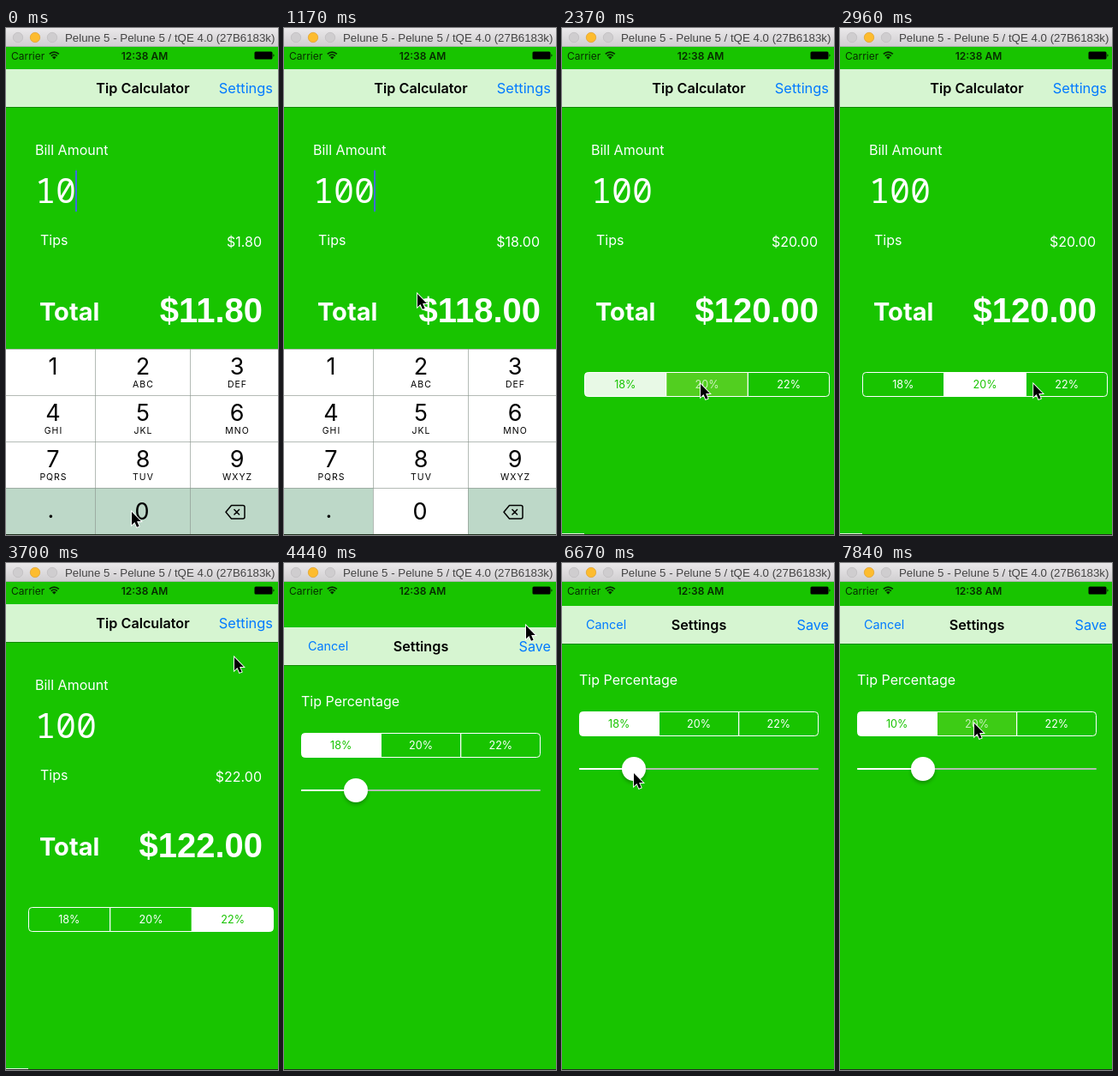
Animation of 318x591 px, one loop 7.99 s. Source, as an HTML page:

```html
<!DOCTYPE html>
<html lang="en">
<head>
<meta charset="utf-8">
<title>Tip Calculator</title>
<style>
html, body { margin: 0; width: 100%; height: 100%; overflow: hidden; background: #18c400; }
svg { display: block; width: 318px; height: 591px; }
text { font-family: Inter, Roboto, sans-serif; white-space: pre; }
.mono { font-family: "Noto Sans Mono", "DejaVu Sans Mono", monospace; }
.sans { font-family: "Liberation Sans", Lato, sans-serif; }
</style>
</head>
<body>
<svg id="stage" viewBox="0 0 318 591">
  <defs>
    <linearGradient id="bar" x2="0" y2="1">
      <stop offset="0" stop-color="#eae8ea"/><stop offset="1" stop-color="#d0ced0"/>
    </linearGradient>
    <filter id="soft" x="-50%" y="-50%" width="200%" height="200%"><feGaussianBlur stdDeviation="2"/></filter>
    <clipPath id="screen"><path d="M0 22H318V591H0z"/></clipPath>
  </defs>
</svg>
<script>
const LOOP = 7990, GREEN = '#18c400', BLUE = '#007aff', PALE = '#d6f5d1', PRESSED = '#ffee80';
const stage = document.getElementById('stage');

function add(parent, tag, attrs, label) {
  const el = document.createElementNS('http://www.w3.org/2000/svg', tag);
  for (const k in attrs) el.setAttribute(k, attrs[k]);
  if (label !== undefined) el.textContent = label;
  parent.append(el);
  return el;
}
const group = (parent, attrs) => add(parent, 'g', attrs);
const box = (parent, x, y, width, height, fill, more) =>
  add(parent, 'rect', { x, y, width, height, fill, ...more });
const path = (parent, d, more) => add(parent, 'path', { d, fill: 'none', ...more });
const write = (parent, label, x, y, size, fill, more) =>
  add(parent, 'text', { x, y, 'font-size': size, fill, ...more }, label);
const mid = { 'text-anchor': 'middle' }, end = { 'text-anchor': 'end' };

function navBar(parent, y, title) {
  box(parent, 0, y, 318, 44, PALE);
  box(parent, 0, y + 44, 318, 1, '#000', { opacity: .3 });
  write(parent, title, 160, y + 28, 16.2, '#000', { ...mid, 'font-weight': 600 });
}

function segments(parent, x, y, w, labels) {
  const third = w / 3, left = x + .5, right = x + w - .5, top = y + .5, low = y + 28.5;
  const shapes = [
    `M${x + third} ${top}H${left + 4}q-4 0-4 4V${low - 4}q0 4 4 4H${x + third}z`,
    `M${x + third} ${top}h${third}V${low}h${-third}z`,
    `M${x + 2 * third} ${top}H${right - 4}q4 0 4 4V${low - 4}q0 4-4 4H${x + 2 * third}z`
  ];
  const cells = shapes.map(d => path(parent, d, { stroke: '#fff' }));
  const texts = labels.map((s, i) => write(parent, s, x + third * (i + .5), y + 19, 12.6, '#fff', mid));
  return {
    texts,
    fill(levels) {
      levels.forEach((v, i) => {
        const on = v > .5;
        cells[i].setAttribute('fill', on ? '#fff' : PRESSED);
        cells[i].setAttribute('fill-opacity', v);
        texts[i].setAttribute('fill', on ? GREEN : '#fff');
        texts[i].setAttribute('opacity', v && !on ? .7 : 1);
      });
    }
  };
}

// Calculator view
const view = group(stage, { 'clip-path': 'url(#screen)' });
box(view, 0, 22, 318, 569, GREEN);
navBar(view, 48, 'Tip Calculator');
write(view, 'Settings', 312, 76, 16.4, BLUE, end);
write(view, 'Bill Amount', 34, 148, 16, '#fff');
const bill = write(view, '', 34, 204, 40, '#fff', { class: 'mono' });
const caret = box(view, 0, 166, 2, 48, '#3f6be0');
write(view, 'Tips', 40, 253, 16, '#fff');
const tips = write(view, '', 299, 255, 16, '#fff', end);
write(view, 'Total', 39, 341, 29, '#fff', { 'font-weight': 700 });
const total = write(view, '', 300, 343, 40, '#fff', { ...end, class: 'sans', 'font-weight': 700 });
const rates = segments(view, 26, 401, 287, ['18%', '20%', '22%']);
box(view, 0, 589, 26, 1, '#e8f5e6');

// Number pad
const pad = group(view);
const letters = ['', 'ABC', 'DEF', 'GHI', 'JKL', 'MNO', 'PQRS', 'TUV', 'WXYZ'];
const centers = [55, 160, 270];
box(pad, 0, 374, 318, 217, '#fff');
box(pad, 0, 536, 104, 55, '#bdd8c8');
box(pad, 215, 536, 103, 55, '#bdd8c8');
const zeroKey = box(pad, 104, 536, 111, 55, '#fff');
path(pad, 'M0 374.5H318M0 428.5H318M0 482.5H318M0 536.5H318M104.5 374V591M215.5 374V591',
  { stroke: '#8d978f', 'stroke-opacity': .65 });
letters.forEach((s, i) => {
  const x = centers[i % 3], y = 374 + 54 * Math.floor(i / 3);
  write(pad, i + 1, x, y + 30, 27, '#000', mid);
  write(pad, s, x + .5, y + 45, 10.5, '#000', { ...mid, 'letter-spacing': 1 });
});
write(pad, '0', 159, 573, 27, '#000', mid);
write(pad, '.', 52.5, 571, 27, '#000', mid);
path(pad, 'M263.5 556.5H277q2 0 2 2V570q0 2-2 2H263.5L257 564.2zM266.5 561l6.5 6.5M273 561l-6.5 6.5',
  { stroke: '#000', 'stroke-width': 1.5, 'stroke-linejoin': 'round' });

// Settings sheet
const sheet = group(group(stage, { 'clip-path': 'url(#screen)' }));
box(sheet, 0, 22, 318, 569, GREEN);
navBar(sheet, 50, 'Settings');
write(sheet, 'Cancel', 28, 77, 14.4, BLUE);
write(sheet, 'Save', 312, 78, 16.2, BLUE, end);
write(sheet, 'Tip Percentage', 20, 142, 16, '#fff');
const presets = segments(sheet, 20, 173, 280, ['18%', '20%', '22%']);
box(sheet, 20, 239, 280, 2, '#b4bdb2', { rx: 1 });
const track = box(sheet, 20, 239, 64, 2, '#fff', { rx: 1 });
const thumb = group(sheet);
add(thumb, 'circle', { cy: 243, r: 13.5, fill: '#000', opacity: .28, filter: 'url(#soft)' });
add(thumb, 'circle', { cy: 240, r: 14, fill: '#fff' });

// Status bar and window frame
const ink = '#062c00';
write(stage, 'Carrier', 6, 36.5, 12, ink);
path(stage, 'M50.8 30.3a7.8 7.8 0 0 1 11 0M52.8 32.6a5 5 0 0 1 7 0', { stroke: ink, 'stroke-width': 1.7 });
path(stage, 'M53.9 34.1a3.4 3.4 0 0 1 4.8 0L56.3 36.6z', { fill: ink });
write(stage, '12:38 AM', 162, 36.5, 12, ink, { ...mid, 'font-weight': 600 });
box(stage, 290.5, 27.5, 21, 9, '#000', { rx: 1.5 });
path(stage, 'M312.5 30.3q2 1.7 0 3.4z', { fill: '#000' });
box(stage, 0, 0, 318, 22, 'url(#bar)');
box(stage, 0, 21, 318, 1, '#b2b4b0');
['#cfcdcf', '#fdbc2e', '#cfcdcf'].forEach((fill, i) =>
  add(stage, 'circle', { cx: 14 + 20 * i, cy: 11, r: 5.7, fill, stroke: i == 1 ? '#e0a028' : '#bdbbbd', 'stroke-width': .7 }));
write(stage, 'Pelune 5 - Pelune 5 / tQE 4.0 (27B6183k)', 69, 16, 13.3, '#444', { class: 'sans' });
box(stage, 0, 590, 318, 1, '#20301e');

const pointer = path(stage, 'M0 0V15.2L3.5 12 6 17.8 8.6 16.7 6.1 11H10.8z',
  { fill: '#000', stroke: '#fff', 'stroke-width': 1.8, 'paint-order': 'stroke' });

// Moments at which the picture refreshes: first, last, count
const bursts = [[0, 0, 1], [150, 730, 5], [1170, 1170, 1], [1620, 2660, 8], [2810, 3850, 8],
  [4000, 5030, 8], [5180, 5480, 3], [6080, 7110, 8], [7260, 7840, 5]];
const tens = v => Math.floor(v / 10) * 10;
const ticks = bursts.flatMap(([a, b, n]) =>
  Array.from({ length: n }, (_, i) => tens(a + (n > 1 ? (b - a) * i / (n - 1) : 0))));
const snap = t => ticks.reduce((last, tick) => tick <= t ? tick : last, 0);

// Pointer stops: time, x, y
const stops = [[0, 147, 564], [150, 147, 564], [730, 156, 310], [1700, 156, 310], [2220, 162, 415],
  [2700, 162, 415], [3110, 259, 415], [3250, 259, 415], [3700, 267, 110], [3850, 274, 91],
  [4000, 283, 73], [4590, 283, 73], [5030, 188, 163], [5480, 137, 189], [5960, 137, 189],
  [6520, 84, 245], [6690, 84, 245], [7110, 97, 245], [7200, 97, 245], [7690, 157, 187], [LOOP, 157, 187]];

const clamp = v => Math.min(1, Math.max(0, v));
const part = (t, a, b) => clamp((t - a) / (b - a));
const smooth = p => p * p * (3 - 2 * p);
const money = v => '$' + v.toFixed(2);

function pointerAt(t) {
  const i = Math.max(1, stops.findIndex(s => s[0] >= t));
  const [a, x, y] = stops[i - 1], [b, u, v] = stops[i], p = smooth(part(t, a, b));
  return [x + (u - x) * p, y + (v - y) * p];
}

function draw(now) {
  const t = snap(now);
  const amount = t < 150 ? 10 : 100;
  const rate = t < 2360 ? .18 : t < 3250 ? .2 : .22;
  bill.textContent = amount;
  tips.textContent = money(amount * rate);
  total.textContent = money(amount * (1 + rate));
  caret.setAttribute('x', amount == 10 ? 81 : 105);
  caret.setAttribute('opacity', t < 720 || (t >= 1170 && t < 1620) ? 1 : 0);
  zeroKey.setAttribute('fill', t < 150 ? '#bdd8c8' : '#fff');
  pad.setAttribute('transform', `translate(0 ${217 * smooth(part(t, 1590, 2040))})`);
  rates.fill(t < 2360 ? [1, 0, 0] : t < 2500 ? [.9, .25, 0] : t < 3250 ? [0, 1, 0] : [0, 0, 1]);

  const rise = Math.round(569 * (1 - part(t, 4083, 4634)) ** 3);
  sheet.setAttribute('transform', `translate(0 ${rise})`);
  const knob = 84 + 13 * smooth(part(t, 6690, 7110));
  thumb.setAttribute('transform', `translate(${knob.toFixed(1)} 0)`);
  track.setAttribute('width', knob - 20);
  presets.texts[0].textContent = (t < 6800 ? 18 : Math.round((knob - 34) / 252 * 40)) + '%';
  presets.fill([1, t >= 7830 ? .16 : 0, 0]);

  pointer.setAttribute('transform', `translate(${pointerAt(t).map(v => v.toFixed(1)).join(' ')})`);
}

function frame() {
  draw(performance.now() % LOOP);
  requestAnimationFrame(frame);
}
frame();
</script>
</body>
</html>
```
